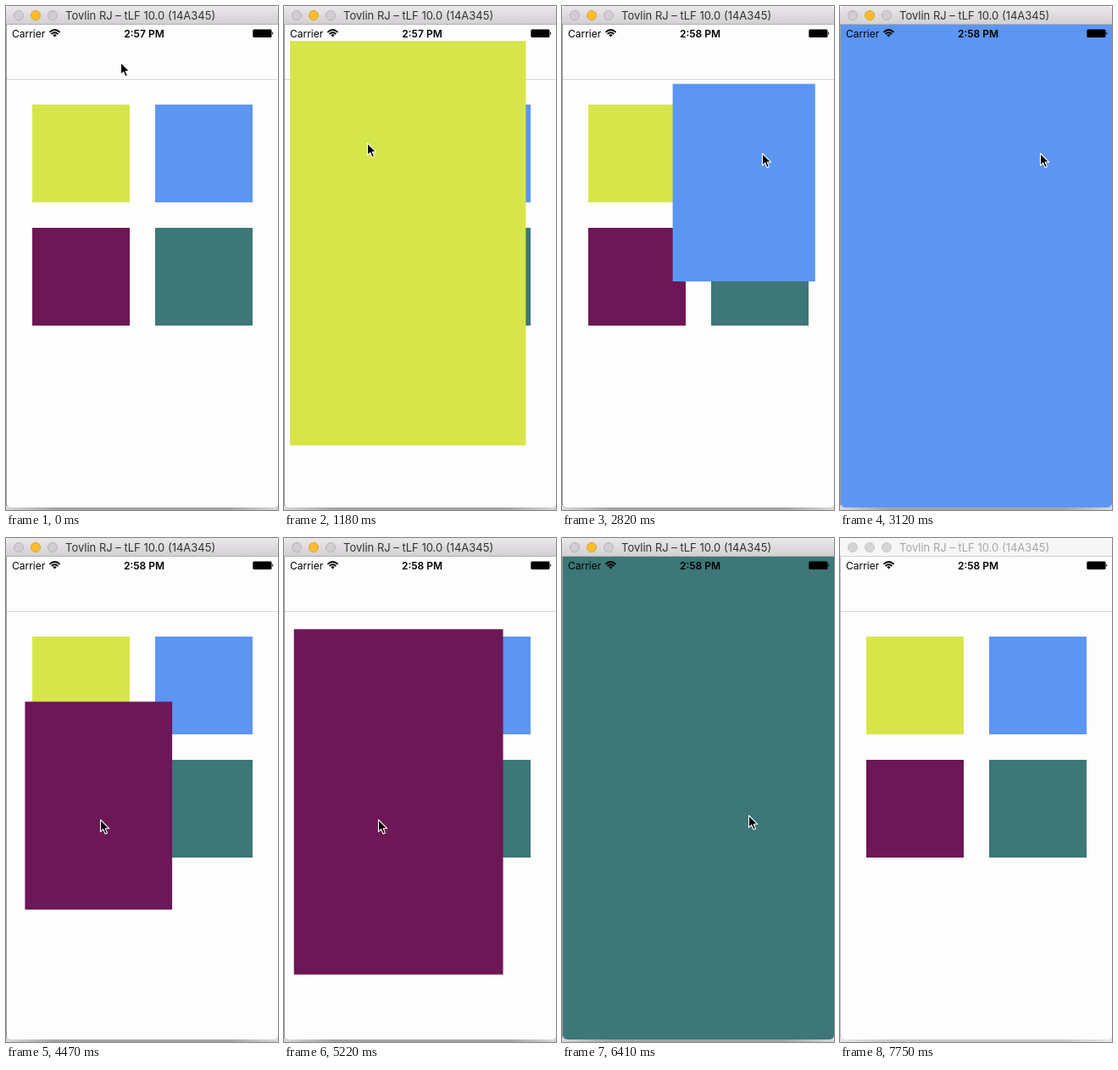
Recreate the animation shown at these times as an HTML page. Size 321 px wide and 593 px high, loop 7.85 s.

```html
<!DOCTYPE html>
<html lang="en">
<head>
<meta charset="utf-8">
<title>Expanding tiles</title>
<style>
  html, body { margin: 0; width: 321px; height: 593px; overflow: hidden; background: #fff; }
  svg { display: block; font-family: Inter, "Liberation Sans", sans-serif; }
  .bar { fill: url(#bar); }
  .edge { fill: #b1afb1; }
  .title { font-size: 13px; fill: #333233; }
  .dot { fill: #d0ced0; stroke: #b4b2b4; }
  .dot.on { fill: #fdbd2d; stroke: #e0a023; }
  .idle .bar { fill: #f6f6f6; }
  .idle .edge { fill: #d0d0d0; }
  .idle .title { fill: #a6a6a6; }
  .idle .dot { fill: #d5d5d5; stroke: #c6c6c6; }
  .idle .shade { opacity: .6; }
</style>
</head>
<body>
<svg id="stage" width="321" height="593" viewBox="0 0 321 593">
  <defs>
    <linearGradient id="bar" x2="0" y2="1">
      <stop stop-color="#eae8ea"/><stop offset="1" stop-color="#d2d0d2"/>
    </linearGradient>
    <linearGradient id="shade">
      <stop stop-color="#d8d8d8"/><stop offset=".18" stop-color="#a4a4a4"/>
      <stop offset=".82" stop-color="#a4a4a4"/><stop offset="1" stop-color="#d8d8d8"/>
    </linearGradient>
    <clipPath id="screen"><rect x="1" y="10" width="320" height="580" rx="5"/></clipPath>
  </defs>

  <g class="shade">
    <rect y="584" width="321" height="9" fill="url(#shade)"/>
    <rect y="5" width="1" height="583" fill="#9b9b9b"/>
  </g>
  <g clip-path="url(#screen)">
    <rect x="1" y="22" width="320" height="568" fill="#fdfdfd"/>
    <rect x="1" y="86" width="320" height="1" fill="#d6d6d6"/>
    <g id="tiles"></g>
  </g>

  <path class="bar" d="M0 21V5Q0 0 5 0H316Q321 0 321 5V21Z"/>
  <rect class="edge" y="21" width="321" height="1"/>
  <circle class="dot" cx="15" cy="11" r="5.5"/>
  <circle class="dot on" cx="35" cy="11" r="5.5"/>
  <circle class="dot" cx="55" cy="11" r="5.5"/>
  <text class="title" x="70" y="16">Tovlin RJ – tLF 10.0 (14A345)</text>

  <g font-size="12">
    <text x="7" y="36.5">Carrier</text>
    <text id="clock" x="163" y="36.5" text-anchor="middle" font-weight="600">2:57 PM</text>
  </g>
  <g fill="none" stroke="#000" stroke-width="1.7">
    <path d="M51.4 30.8Q57.5 25.2 63.6 30.8M53.6 33Q57.5 29.5 61.4 33"/>
    <path d="M55.3 34.2Q57.5 32.4 59.7 34.2L57.5 36.6Z" fill="#000" stroke="none"/>
  </g>
  <rect x="291.3" y="27.4" width="22.2" height="9.6" rx="1.5"/>
  <path d="M314.2 30.5Q316.4 32.2 314.2 33.9Z"/>

  <path id="cursor" d="M0 0V14.2L3.2 11.2L5.6 16.6L8 15.6L5.7 10.3H10.3Z"
        stroke="#fff" stroke-width="1.1" stroke-linejoin="round"/>
</svg>

<script>
const LOOP = 7850, TICK = 149.25, LEAD = 20, SPAN = 3;
const FULL = [1, 22, 321, 590];

// Tile corner, colour, and the ticks at which it starts to open and close
const tiles = [
  { x: 31,  y: 116, fill: '#d6e64a', open: 5.87,  close: 10.627 },
  { x: 176, y: 116, fill: '#5d95f2', open: 18,    close: 24.3 },
  { x: 31,  y: 261, fill: '#6d1756', open: 28.94, close: 33.79 },
  { x: 176, y: 261, fill: '#3d7777', open: 40,    close: 45.3 },
];

// Pointer stops: tick, x, y
const path = [
  [0, 135.5, 66.5], [6, 98.5, 161.5], [12, 98.5, 161.5], [14, 236.5, 173.5], [25, 236.5, 173.5],
  [29, 111.5, 331.5], [35, 111.5, 331.5], [37, 220.5, 326.5], [46, 220.5, 326.5], [51, 335, 300],
];

const $ = id => document.getElementById(id);
const lerp = (a, b, p) => a + (b - a) * p;
const smooth = q => q * q * (3 - 2 * q);

// Progress of a move begun at `start`; the first sliver is not yet visible
function ease(tick, start) {
  const q = Math.min(1, (tick - start) / SPAN);
  return q < 0.08 ? 0 : smooth(q);
}

for (const tile of tiles) {
  tile.el = document.createElementNS('http://www.w3.org/2000/svg', 'rect');
  tile.el.setAttribute('fill', tile.fill);
  $('tiles').append(tile.el);
}

function placeTile(tile, tick) {
  const p = ease(tick, tile.open) - ease(tick, tile.close);
  const rest = [tile.x, tile.y, tile.x + 115, tile.y + 115];
  const [l, t, r, b] = rest.map((v, i) => lerp(v, FULL[i], p));
  const box = { x: l, y: t, width: r - l, height: b - t };
  for (const key in box) tile.el.setAttribute(key, box[key]);
  return p > 0;
}

function pointerAt(tick) {
  const i = path.findIndex(stop => stop[0] > tick);
  if (i < 0) return path[path.length - 1].slice(1);
  const [a, b] = [path[i - 1], path[i]];
  const p = smooth((tick - a[0]) / (b[0] - a[0]));
  return [lerp(a[1], b[1], p), lerp(a[2], b[2], p)];
}

let shown = -1;
function draw(now) {
  const tick = Math.floor((now % LOOP + LEAD) / TICK);
  if (tick === shown) return;
  shown = tick;
  for (const tile of tiles) {
    // A moving tile lies above the others
    if (placeTile(tile, tick) && tile.el.nextSibling) $('tiles').append(tile.el);
  }
  $('cursor').setAttribute('transform', `translate(${pointerAt(tick)})`);
  $('clock').textContent = tick < 19 ? '2:57 PM' : '2:58 PM';
  $('stage').classList.toggle('idle', tick >= 52);
}

const began = performance.now();
function frame() {
  draw(performance.now() - began);
  requestAnimationFrame(frame);
}
frame();
</script>
</body>
</html>
```
